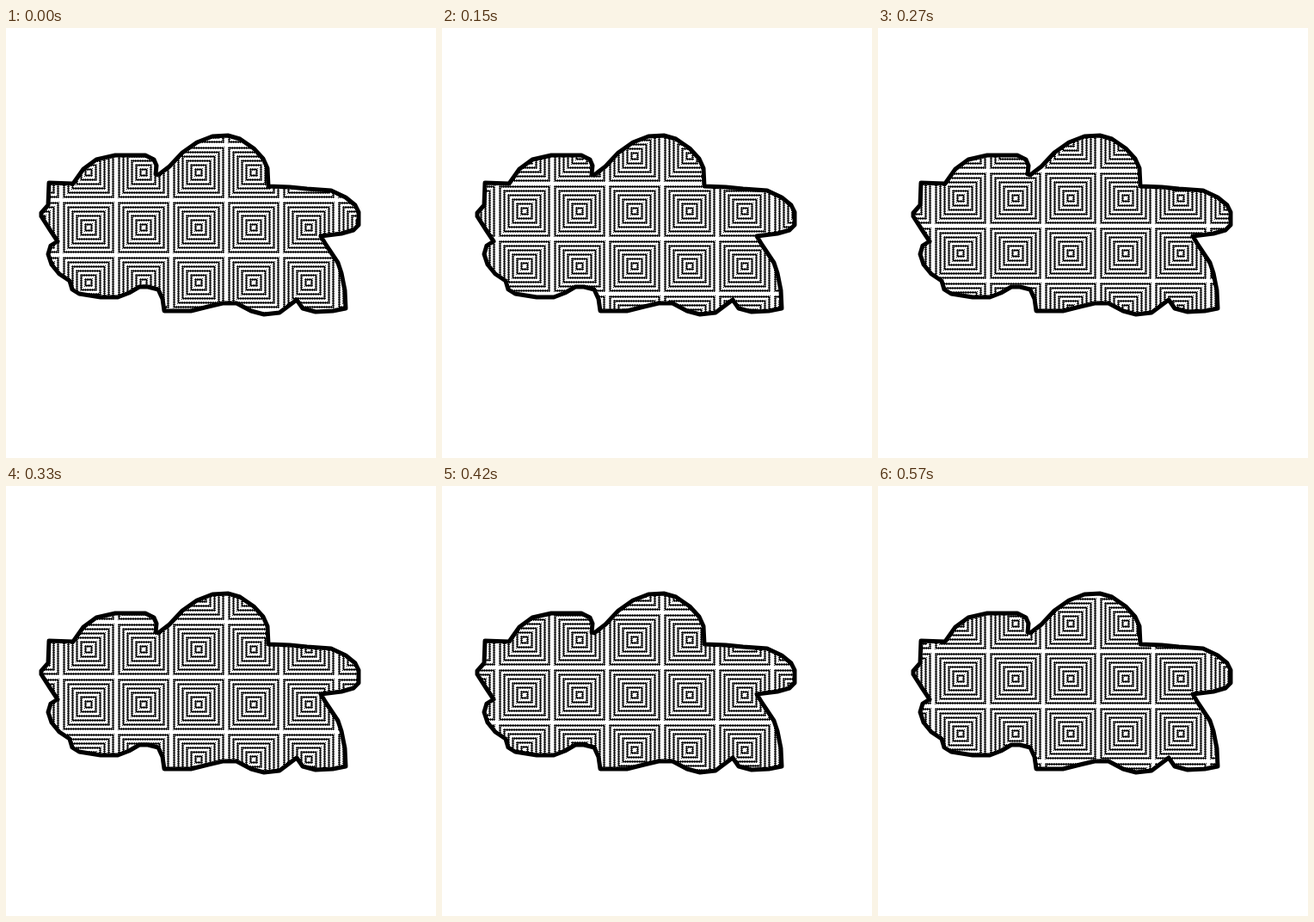
Recreate the animation shown at these times as an HTML page with a canvas. Size 500 by 500 pixels, loop 0.6 s.

```html
<!DOCTYPE html>
<html>
<head>
<meta charset="utf-8">
<style>
html, body { margin: 0; width: 100%; height: 100%; overflow: hidden; background: #fff; }
canvas { display: block; width: 500px; height: 500px; }
</style>
</head>
<body>
<canvas id="stage" width="500" height="500"></canvas>
<script>
const ctx = document.getElementById('stage').getContext('2d');
const TILE = 64, LOOP = 600, STEP = 30, SHIFT = 64 / 17;

// Closed blob outline: x,y pairs.
const blob = new Path2D('M' + `50,180 78,181 90,164 105,153 127,148 162,148
  172,153 175,160 174,170 177,171 190,161 205,145 222,133 240,126 258,125
  272,129 288,140 299,152 304,163 305,184 330,185 350,187 378,189 395,197
  406,206 410,214 410,229 404,235 390,239 366,242 372,252 386,273 390,285
  394,305 395,326 380,329 360,330 345,326 338,316 330,322 318,331 300,333
  285,329 268,320 252,320 235,324 215,329 184,329 182,315 177,304 165,301
  155,301 143,308 130,313 110,313 85,309 77,304 74,294 62,286 53,275
  49,263 52,253 60,248 52,236 41,219 41,215 49,206`.trim().split(/\s+/).join('L') + 'Z');

// One tile of concentric squares with serrated lines.
function makeTile() {
  const c = document.createElement('canvas');
  c.width = c.height = TILE;
  const g = c.getContext('2d');
  g.fillStyle = '#fff';
  g.fillRect(0, 0, TILE, TILE);
  g.fillStyle = '#000';
  for (let y = 0; y < TILE; y++) {
    for (let x = 0; x < TILE; x++) {
      const r = Math.floor(Math.max(Math.abs(x - 31.5), Math.abs(y - 31.5)));
      const band = (r + 3) % 5;
      if (r > 29) continue;
      if (band === 1 || (band === 0 || band === 2) && (x + y) % 2) g.fillRect(x, y, 1, 1);
    }
  }
  return c;
}
const tile = makeTile();

function draw(now) {
  const i = Math.floor((now % LOOP) / STEP);
  const top = Math.floor(200 - SHIFT * i);
  ctx.fillStyle = '#fff';
  ctx.fillRect(0, 0, 500, 500);
  ctx.save();
  ctx.clip(blob);
  for (let y = top - TILE * 2; y < 340; y += TILE)
    for (let x = 0; x < 420; x += TILE) ctx.drawImage(tile, x, y);
  ctx.restore();
  ctx.lineWidth = 5;
  ctx.lineJoin = 'round';
  ctx.strokeStyle = '#000';
  ctx.stroke(blob);
}

const start = performance.now();
function frame() {
  draw(performance.now() - start);
  requestAnimationFrame(frame);
}
frame();
</script>
</body>
</html>
```
